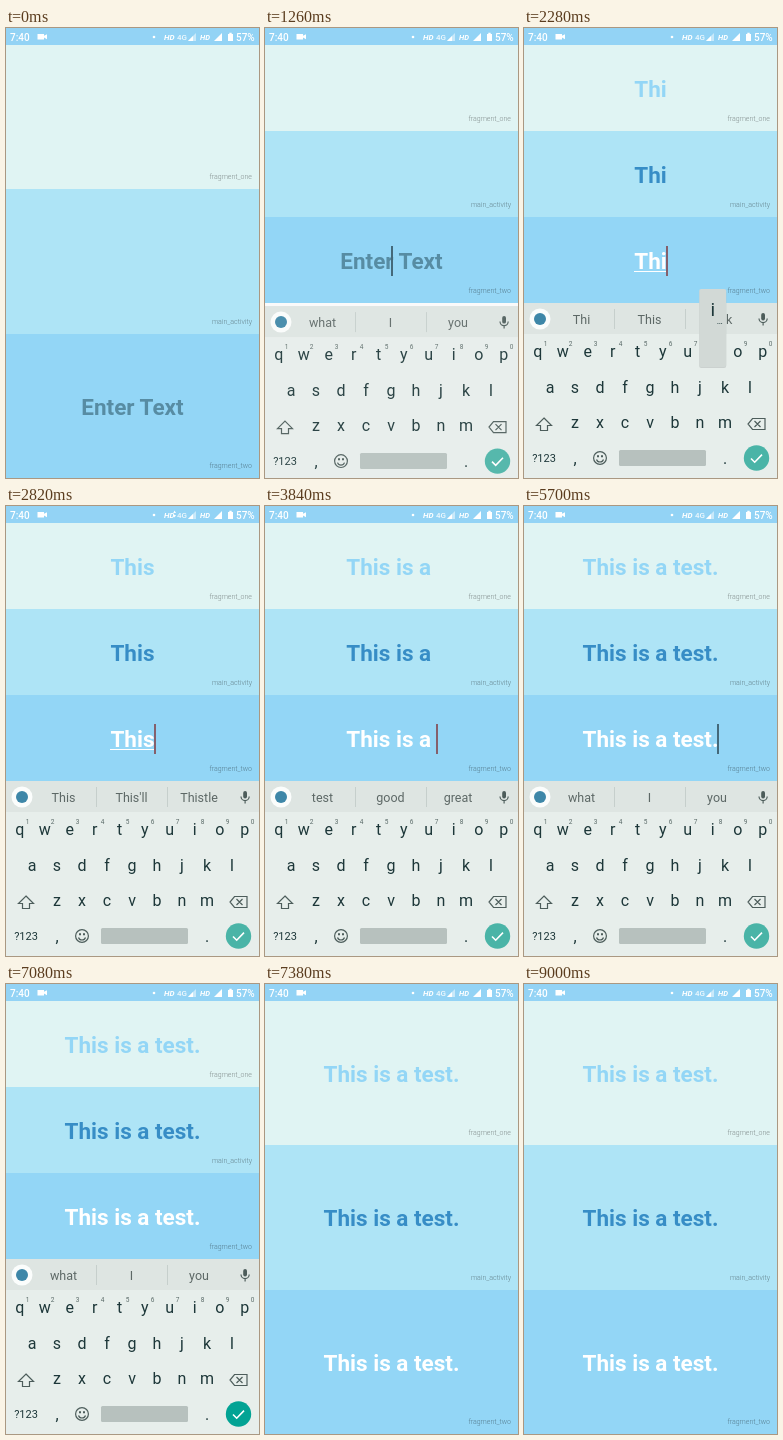
Recreate the animation shown at these times as an HTML page. Size 253 by 450 pixels, loop 9.06 s.

```html
<!DOCTYPE html>
<html lang="en">
<head>
<meta charset="utf-8">
<title>Mirrored text</title>
<style>
  html, body { margin: 0; width: 100%; height: 100%; overflow: hidden; background: #fafafa; }
  body { position: relative; font-family: Roboto, sans-serif; }
  svg { position: absolute; left: 0; overflow: visible; font-family: Roboto, sans-serif; }
  #status { top: 0; background: #93d3f5; }
  #status text { fill: #fff; font-weight: 500; }
  #status .hd { font-weight: 700; font-style: italic; }

  #panes { position: absolute; top: 17px; left: 0; width: 253px; height: 433px; display: flex; flex-direction: column; }
  #panes.short { height: 258px; }
  .pane { flex: 1; position: relative; }
  .pane p { position: absolute; left: 0; width: 253px; top: calc(50% - 14px); margin: 0; text-align: center;
    font: 700 22.5px/30px Roboto, sans-serif; white-space: pre; }
  .pane small { position: absolute; right: 7px; bottom: 6px; font: 300 7px/11px Roboto, sans-serif; color: rgba(0, 0, 0, .42); }
  #one { background: #e0f4f3; color: #93d6f6; }
  #main { background: #aee4f6; color: #378dc6; }
  #two { background: #93d6f6; color: #fff; }
  #hint { color: #578ca3; }
  #composing { box-shadow: inset 0 -1px #fff; display: inline-block; height: 26px; line-height: 30px; vertical-align: top; }
  #caret { position: absolute; width: 2px; height: 30px; margin-left: -1px; }

  #keyboard { top: 275px; }
  .key { font-size: 16px; fill: #1d3739; text-anchor: middle; }
  .upper .letter { text-transform: uppercase; }
  .digit { font-size: 6.5px; fill: #5b6b69; text-anchor: middle; }
  .word { font-size: 12.5px; fill: #5d6866; text-anchor: middle; }
  .icon { fill: none; stroke: #4d5d5b; stroke-width: 1.2; }
</style>
</head>
<body>
<svg id="status" width="253" height="17">
  <g fill="#fff">
    <text x="4" y="12.5" font-size="10">7:40</text>
    <path d="M31.5 6h6.5v1.8l3-1.6v5l-3-1.6v1.9h-6.5z"/>
    <circle cx="148" cy="9" r="1.3"/>
    <text class="hd" x="158" y="11.5" font-size="8">HD</text>
    <path id="traffic" d="M168.6 4.5l1.4 2.6h-2.8zM168.6 11.5l1.4-2.6h-2.8z"/>
    <text x="171" y="11.5" font-size="8" opacity=".85">4G</text>
    <path d="M190 5v8h-8z" opacity=".5"/><path d="M187 8v5h-5z"/>
    <text class="hd" x="194" y="11.5" font-size="7.6">HD</text>
    <path d="M216 5v8h-8z"/>
    <path d="M222 6h1.3v-1.2h2.4v1.2h1.3v7h-5z"/>
    <text x="230" y="12.5" font-size="10">57%</text>
  </g>
</svg>

<div id="panes">
  <div class="pane" id="one"><p class="mirror"></p><small>fragment_one</small></div>
  <div class="pane" id="main"><p class="mirror"></p><small>main_activity</small></div>
  <div class="pane" id="two">
    <p id="hint">Enter Text</p>
    <p><span id="done"></span><span id="composing"></span><i id="caret"></i></p>
    <small>fragment_two</small>
  </div>
</div>

<svg id="keyboard" width="253" height="175" viewBox="0 275 253 175">
  <rect y="275" width="253" height="175" fill="#e7eeeb"/>
  <rect y="275" width="253" height="31" fill="#dee5e2"/>
  <path d="M90.5 281v20M161.5 281v20" stroke="#c6cfcc"/>
  <circle cx="16" cy="291" r="10.5" fill="#fbfdfc"/>
  <circle cx="16" cy="291" r="6" fill="#3e87a8"/>
  <g id="words">
    <text class="word" x="57.5" y="295.5"/>
    <text class="word" x="125.5" y="295.5"/>
    <text class="word" x="193" y="295.5"/>
  </g>
  <rect x="237.2" y="285" width="3.8" height="7.5" rx="1.9" fill="#4d5d5b"/>
  <path class="icon" d="M235 290.5a4.1 4.1 0 0 0 8.2 0M239.1 294.5v3"/>
  <g id="keys"></g>
  <path id="shift" class="icon" d="M20 390l7.5 7.5h-4v5h-7v-5h-4z"/>
  <path class="icon" d="M228.5 390.5h12.5v11h-12.5l-4.5-5.5zM230.5 393l6 6M236.5 393l-6 6"/>
  <text class="key" x="20" y="434" style="font-size:11px">?123</text>
  <text class="key" x="51" y="436">,</text>
  <circle class="icon" cx="76" cy="430" r="6.4"/>
  <path class="icon" d="M72.5 431.5a3.7 3.7 0 0 0 7 0"/>
  <path d="M73 427.2h2v2h-2zM77 427.2h2v2h-2z" fill="#4d5d5b"/>
  <rect x="95" y="422" width="87" height="16" rx="1.5" fill="#b7c1be"/>
  <text class="key" x="201" y="436">.</text>
  <circle id="enter" cx="232.5" cy="430" r="12.7"/>
  <path d="M227 430.5l3.7 3.7 7.3-7.6" fill="none" stroke="#fff" stroke-width="1.6"/>
  <g id="popup">
    <rect x="-13.5" y="-63" width="27" height="78" rx="2" fill="#000" opacity=".12" transform="translate(0 1)"/>
    <rect x="-13.5" y="-63" width="27" height="78" rx="2" fill="#d2d9d6"/>
    <text class="key" id="popChar" y="-36.5" style="font-size:19px"/>
    <text class="key" x="7" y="-28" style="font-size:9px">…</text>
  </g>
</svg>

<script>
const LOOP = 9060, BLINK = 480;
const FOCUS = 1000, SHOW = 1140, SHIFT = 1800, PRESS = 7080, HIDE = 7200;
const $ = id => document.getElementById(id);

// time, committed text, underlined text, suggestions
const steps = [
  [FOCUS, '', '', 'what|I|you'],
  [2040, '', 'T', 'T|The|This'],
  [2160, '', 'Th', 'Th|The|This'],
  [2280, '', 'Thi', 'Thi|This|Think'],
  [2400, '', 'This', "This|This'll|Thistle"],
  [3180, 'This ', '', 'is|was|one'],
  [3300, 'This ', 'i', 'i|is|in'],
  [3420, 'This ', 'is', 'is|isn\'t|issue'],
  [3540, 'This is ', '', 'the|a|not'],
  [3660, 'This is ', 'a', 'a|and|as'],
  [3780, 'This is a ', '', 'test|good|great'],
  [4260, 'This is a ', 't', 't|the|to'],
  [4440, 'This is a ', 'te', 'te|test|team'],
  [4620, 'This is a ', 'tes', 'tes|test|Norvu'],
  [4860, 'This is a ', 'test', 'test|tests|testing'],
  [5640, 'This is a test.', '', 'what|I|you']
];

const spots = { '.': [201, 430] };
const rows = [['qwertyuiop', 13.7, 324], ['asdfghjkl', 26, 359.5], ['zxcvbnm', 51, 395]];
let markup = '';
for (const [letters, left, y] of rows) {
  [...letters].forEach((letter, i) => {
    const x = left + 25 * i;
    spots[letter] = [x, y];
    markup += `<text class="key letter" x="${x}" y="${y + 5.3}">${letter}</text>`;
    if (y === 324) markup += `<text class="digit" x="${x + 7.8}" y="318.3">${(i + 1) % 10}</text>`;
  });
}
$('keys').innerHTML = markup;

const words = [...$('words').children];
const mirrors = document.querySelectorAll('.mirror');
const typed = step => step[1] + step[2];
const show = (el, on) => { el.style.visibility = on ? 'visible' : 'hidden'; };
const write = (el, text) => { if (el.textContent !== text) el.textContent = text; };
const clamp = v => Math.min(1, Math.max(0, v));

function drawText(t, step) {
  const text = typed(step);
  mirrors.forEach(el => write(el, text));
  write($('done'), step[1]);
  write($('composing'), step[2]);
  show($('hint'), !text);
  step[3].split('|').forEach((word, i) => write(words[i], word));
  show($('caret'), t >= FOCUS && Math.floor((t - step[0]) / BLINK) % 2 === 0);
  $('caret').style.background = t > 2040 && t < 4200 ? '#85606c' : '#44697a';
}

function drawPopup(t) {
  const pressed = steps.find(s => t >= s[0] - 90 && t < s[0] + 20 && typed(s));
  const char = pressed ? typed(pressed).slice(-1) : ' ';
  const spot = spots[char.toLowerCase()];
  $('popup').style.display = spot ? '' : 'none';
  if (!spot) return;
  $('popup').setAttribute('transform', `translate(${spot})`);
  write($('popChar'), char);
}

function drawKeyboard(t) {
  const board = $('keyboard');
  const enter = 1 - (1 - clamp((t - SHOW) / 280)) ** 3;
  const leave = clamp((t - HIDE) / 180) ** 2;
  const shown = enter * (1 - leave);
  const upper = t >= SHIFT && t < 2040;
  board.style.display = shown > 0 ? '' : 'none';
  board.style.transform = `translateY(${17 * (1 - shown)}px)`;
  board.style.opacity = t < HIDE ? Math.min(1, enter * 1.14) : 1 - leave;
  board.classList.toggle('upper', upper);
  $('shift').style.fill = upper ? '#4d5d5b' : 'none';
  $('enter').style.fill = t >= PRESS ? '#02a394' : '#4ab4a7';
  $('panes').classList.toggle('short', t >= SHOW && t < HIDE);
}

function draw(now) {
  const t = now % LOOP;
  const step = steps.filter(s => s[0] <= t).pop() || steps[0];
  drawText(t, step);
  drawKeyboard(t);
  drawPopup(t);
  show($('traffic'), (t >= 2400 && t < 3300) || (t >= 4400 && t < 5300));
  requestAnimationFrame(() => draw(performance.now() - start));
}
const start = performance.now();
draw(0);
</script>
</body>
</html>
```
